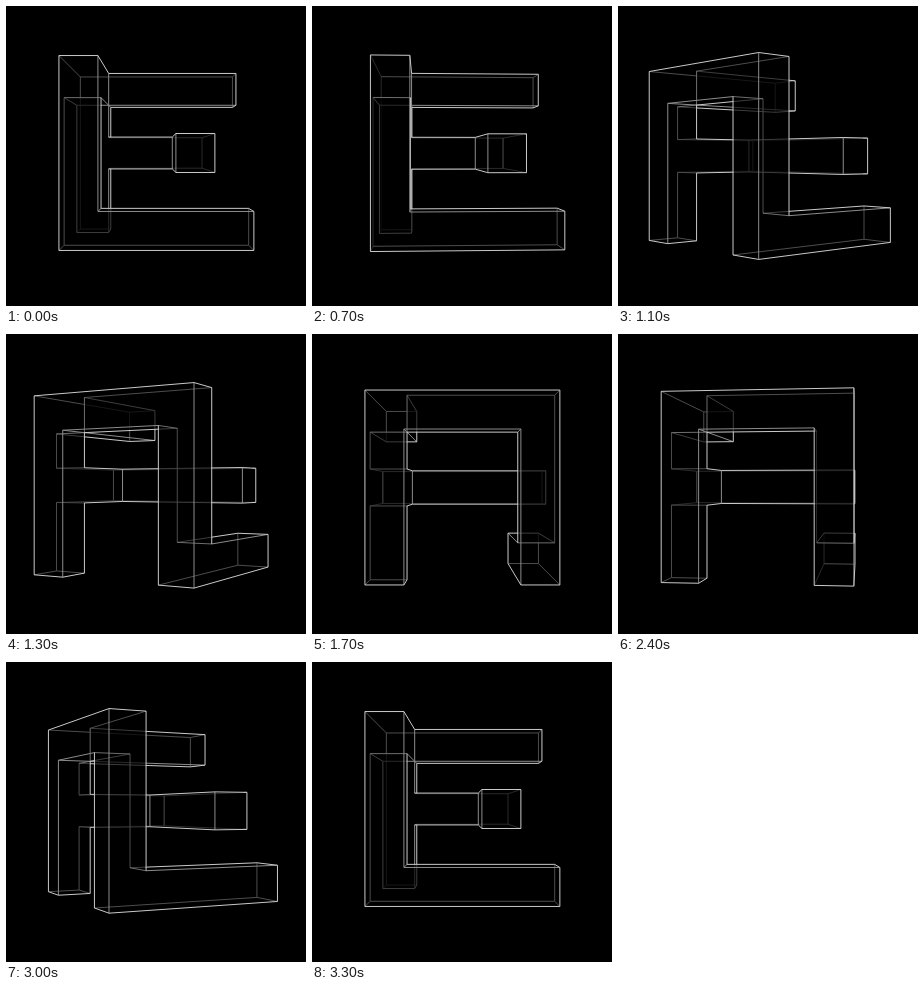
Animation of 300x300 px, one loop 3400 ms. Source, as an HTML page with a canvas:

```html
<!DOCTYPE html>
<html lang="en">
<head>
<meta charset="utf-8">
<title>E / A wireframe</title>
<style>
  html, body { margin: 0; width: 100%; height: 100%; overflow: hidden; background: #000; }
  canvas { display: block; width: 300px; height: 300px; }
</style>
</head>
<body>
<canvas id="stage"></canvas>
<script>
const LOOP = 3400, STEP = 100;
const SIZE = 5, HALF = SIZE / 2;
const DIST = 20.25, FOCAL = 692;
const SAMPLES = 240;
const SHADE = 0.55;    // light left after one translucent face
const OUTLINE = 0.4;   // share of a face lying over an outline edge

// Solid as overlapping boxes: [min, max] with x right, y down, z toward the viewer.
const boxes = [
  [[0, 0, 4], [1, 5, 5]],  // near leg
  [[0, 0, 0], [1, 5, 1]],  // far leg
  [[0, 0, 0], [1, 1, 5]],  // top of the A
  [[0, 0, 0], [5, 1, 1]],  // top arm
  [[0, 2, 0], [4, 3, 1]],  // middle arm
  [[3, 2, 0], [4, 3, 5]],  // crossbar of the A
  [[0, 4, 4], [5, 5, 5]]   // bottom arm
];

const filled = cell => boxes.some(([lo, hi]) =>
  cell.every((v, i) => v >= lo[i] && v < hi[i]));

// Build a vector from its part along an axis and the two that follow it.
function vec(axis, k, u, v) {
  const p = [0, 0, 0];
  p[axis] = k;
  p[(axis + 1) % 3] = u;
  p[(axis + 2) % 3] = v;
  return p;
}

// Signs of the two face normals meeting at a grid line, or null if it is no edge.
function normals(axis, u, v, k) {
  const around = [[0, 0], [1, 0], [0, 1], [1, 1]];
  const full = around.map(([du, dv]) => filled(vec(axis, k, u - du, v - dv)));
  const n = full.filter(Boolean).length;
  if (n % 2 === 0) return null;
  const convex = n === 1;
  const odd = around[full.indexOf(convex)];
  return odd.map(d => (d === 1) === convex ? 1 : -1);
}

function findEdges() {
  const edges = [];
  for (let axis = 0; axis < 3; axis++)
    for (let u = 0; u <= SIZE; u++)
      for (let v = 0; v <= SIZE; v++) {
        let run = null;
        for (let k = 0; k < SIZE; k++) {
          const signs = normals(axis, u, v, k);
          if (!signs) { run = null; continue; }
          if (!run || String(run.signs) !== String(signs)) {
            run = { axis, signs, a: vec(axis, k - HALF, u - HALF, v - HALF) };
            edges.push(run);
          }
          run.b = vec(axis, k + 1 - HALF, u - HALF, v - HALF);
        }
      }
  return edges;
}

const edges = findEdges();
const canvas = document.getElementById("stage");
const ctx = canvas.getContext("2d");
const dpr = window.devicePixelRatio || 1;
canvas.width = canvas.height = 300 * dpr;
ctx.scale(dpr, dpr);

const clamp = v => Math.min(1, Math.max(0, v));
const lerp = (a, b, t) => a.map((v, i) => v + (b[i] - v) * t);

// Part of the sight line from the eye to p that lies inside a box.
function inside(eye, p, [lo, hi]) {
  const pad = 0.006;
  let near = 0, far = 0.9999;
  for (let i = 0; i < 3; i++) {
    const d = p[i] - eye[i] || 1e-9;
    const t0 = (lo[i] - HALF + pad - eye[i]) / d;
    const t1 = (hi[i] - HALF - pad - eye[i]) / d;
    near = Math.max(near, Math.min(t0, t1));
    far = Math.min(far, Math.max(t0, t1));
  }
  return near < far ? [near, far] : null;
}

// Number of faces between the eye and p.
function facesBefore(eye, p) {
  const spans = boxes.map(box => inside(eye, p, box)).filter(Boolean)
    .sort((s, t) => s[0] - t[0]);
  let count = 0, end = -1;
  for (const [near, far] of spans) {
    if (near > end) count += end < 0 ? 1 : 2;
    end = Math.max(end, far);
  }
  return count + (end > 0 && end < 0.997 ? 1 : 0);
}

function isOutline({ axis, signs, a }, eye) {
  const [f, g] = signs.map((s, i) => {
    const j = (axis + 1 + i) % 3;
    return (eye[j] - a[j]) * s > 0;
  });
  return f !== g;
}

function draw(turn) {
  const angle = turn * Math.PI / 2;
  const c = Math.cos(angle), s = Math.sin(angle);
  const cx = 150.4, cy = 147 + 6.5 * turn;
  const eye = [-DIST * s, 0, DIST * c];

  const project = ([x, y, z]) => {
    const k = FOCAL / (DIST - (z * c - x * s));
    return [cx + (x * c + z * s) * k, cy + y * k];
  };
  const paths = new Map();
  const line = (layers, a, b) => {
    if (!paths.has(layers)) paths.set(layers, new Path2D());
    const path = paths.get(layers);
    path.moveTo(...project(a));
    path.lineTo(...project(b));
  };

  for (const edge of edges) {
    const { a, b } = edge;
    const own = isOutline(edge, eye) ? OUTLINE : 1;
    let start = 0, last = null;
    for (let i = 0; i <= SAMPLES; i++) {
      const faces = i < SAMPLES ? facesBefore(eye, lerp(a, b, (i + 0.5) / SAMPLES)) : null;
      if (faces !== last) {
        if (last !== null)
          line(last + own, lerp(a, b, start / SAMPLES), lerp(a, b, i / SAMPLES));
        start = i;
        last = faces;
      }
    }
  }

  ctx.fillStyle = "#000";
  ctx.fillRect(0, 0, 300, 300);
  ctx.lineWidth = 1;
  for (const layers of [...paths.keys()].sort((m, n) => n - m)) {
    const light = Math.round(255 * SHADE ** layers);
    ctx.strokeStyle = `rgb(${light}, ${light}, ${light})`;
    ctx.stroke(paths.get(layers));
  }
}

// 0 shows the E, 1 shows the A.
const turnAt = t => clamp((t - 662) / 957) - clamp((t - 2321) / 953);

let shown = -1;
const began = performance.now();
function tick() {
  const t = (performance.now() - began) % LOOP;
  const turn = turnAt(Math.floor(t / STEP) * STEP);
  if (turn !== shown) {
    draw(turn);
    shown = turn;
  }
  requestAnimationFrame(tick);
}
tick();
</script>
</body>
</html>
```
